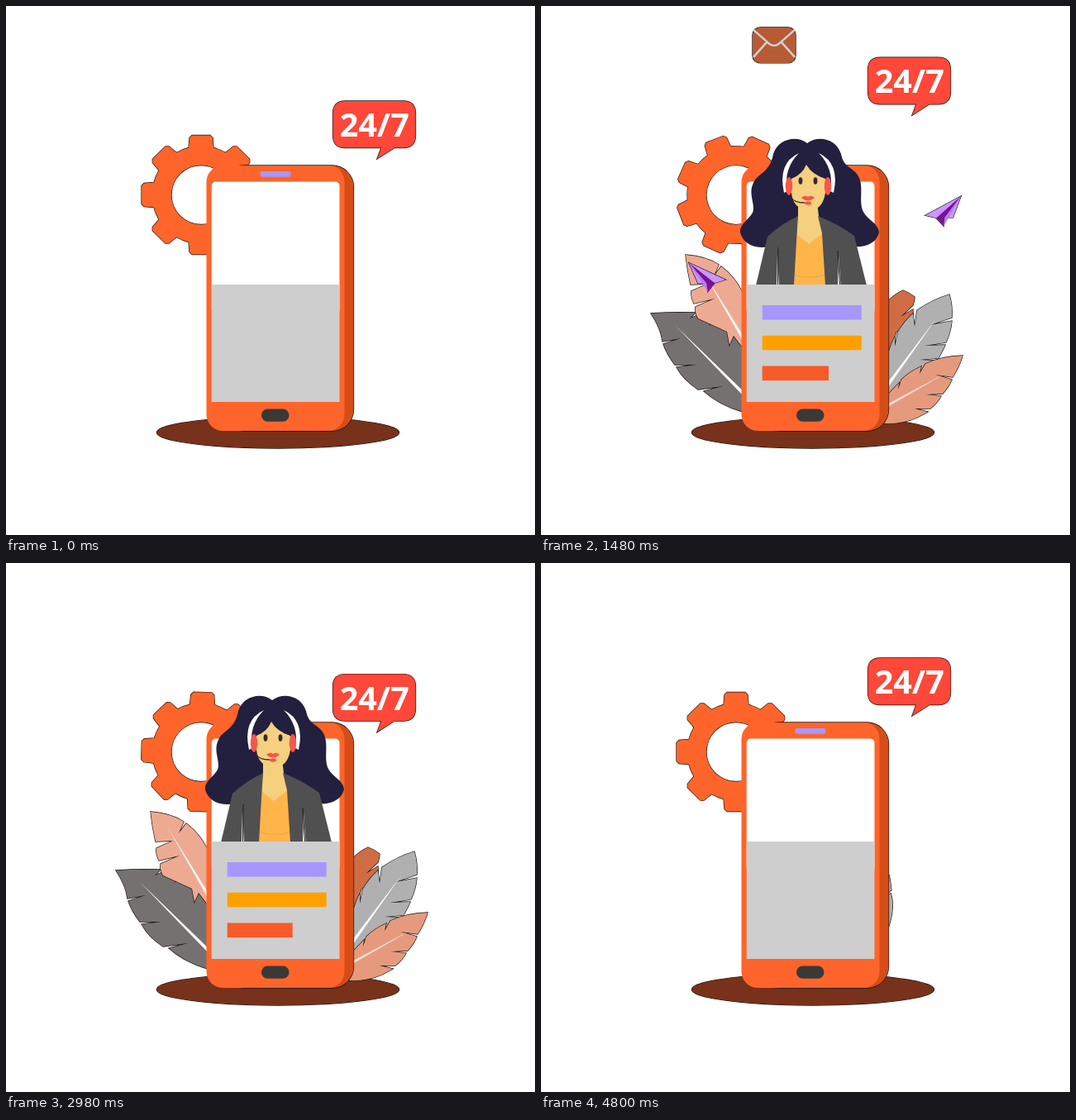
An HTML page that plays this animation: 640 by 640 pixels, repeating every 4.84 s.

```html
<!DOCTYPE html>
<html lang="en">
<head>
<meta charset="utf-8">
<title>Support around the clock</title>
<style>
html, body { margin: 0; width: 100%; height: 100%; overflow: hidden; background: #fff; }
svg { display: block; width: 100vw; height: 100vh; }
.edge { stroke: #141010; stroke-width: 1.3; paint-order: stroke; }
.line { fill: none; stroke: #fff; stroke-width: 2.4; }
.rib { fill: #fff; }
text { font: 700 39.6px "Open Sans", sans-serif; fill: #fff; text-anchor: middle; }
</style>
</head>
<body>
<svg viewBox="0 0 640 640">
  <defs>
    <g id="mail">
      <rect class="edge" x="256" width="52" height="43" rx="9" fill="#de6e40"/>
      <path class="line" d="M257 3L273 17Q282 27 291 17L307 3M257 36L273 18M307 36L291 18"/>
    </g>
    <g id="plane">
      <path class="edge" fill="#cb97ff" d="M29 0L-21 -13L-13 -1L-13 13L-5 6L3 13Z"/>
      <path fill="#7c1097" d="M29 0L-13 -1L-13 13L-5 6Z"/>
      <path fill="#b87bf2" d="M29 0L-13 13L-5 6Z"/>
    </g>
  </defs>

  <ellipse class="edge" cx="329" cy="516" rx="146.6" ry="19" fill="#78311a"/>
  <path id="gear" class="edge" fill="#ff652a" fill-rule="evenodd"/>

  <g id="greyLeft">
    <path class="edge" fill="#757170" d="M133 372Q160 370 187 371L180 378L192 373Q202 375 210 379L203 387L214 381Q228 387 243 404L260 480L244 491Q216 483 197 466L220 460L190 464Q172 452 164 437L188 434L162 434Q152 421 148 409L169 402L147 406Q145 390 133 372Z"/>
    <path class="rib" d="M163 387L251 472L248 475Z"/>
  </g>
  <g id="pinkLeft">
    <path class="edge" fill="#edaa92" d="M175 301Q200 303 215 313L209 327L218 315Q234 327 243 345L262 420L243 412L233 399L228 410L225 394L190 378Q186 372 187 364L210 354L185 360Q181 353 182 345L202 336L181 337Q177 320 175 301Z"/>
    <path class="rib" fill-opacity=".85" d="M195 319L251 409L248 412Z"/>
  </g>
  <g id="orange">
    <path class="edge" fill="#d06c44" d="M438 344Q446 347 452 352Q452 357 450 362L435 376L450 367Q451 374 449 381L430 394L418 430L400 430L400 380Q420 352 438 344Z"/>
  </g>
  <g id="greyRight">
    <path class="edge" fill="#b0b0b0" d="M494 349Q474 355 455 368L452 388L450 372Q440 381 432 394L428 412L428 400Q420 415 416 440L405 480L450 462Q472 447 478 429L458 428L481 426Q487 415 489 410L464 411L490 407Q496 394 497 381L471 386L497 377Q498 362 494 349Z"/>
    <path class="rib" d="M479 377L413 471L410 468Z"/>
  </g>
  <g id="pinkRight">
    <path class="edge" fill="#e59a7d" d="M510 423Q483 424 465 433L458 445L460 436Q445 443 436 452L432 464L433 456L412 478L405 504Q432 508 455 498L468 491L452 487L471 487Q480 480 484 472L466 470L486 469Q494 460 497 452L477 446L498 449Q506 437 510 423Z"/>
    <path class="rib" fill-opacity=".65" d="M492 443L409 491L407 488Z"/>
  </g>

  <g id="mails"></g>
  <use id="planeL" href="#plane"/>
  <use id="planeR" href="#plane"/>

  <rect class="edge" x="262" y="193" width="158.5" height="321" rx="26" fill="#d44d18"/>
  <rect x="242.5" y="193" width="167" height="321" rx="20" fill="#ff652a"/>
  <path fill="#ff652a" d="M380 193H392Q409 195 409 217H380Z"/>
  <rect x="307.5" y="200" width="37" height="6.8" rx="3" fill="#a796fd"/>
  <rect x="248.7" y="212.5" width="154.8" height="160" rx="5" fill="#fff"/>
  <rect x="309" y="487.5" width="33.5" height="15.2" rx="7.5" fill="#3b3838"/>

  <g id="agent">
    <path fill="#231f3e" d="M322 166C310 156 287 160 281 179C277 202 262 202 257 214C250 228 260 240 256 250C250 260 240 264 241 274C245 290 265 297 284 288L366 288C382 295 405 291 409 274C408 262 394 259 389 247C384 232 392 216 382 203C376 195 366 195 363 179C357 160 335 156 322 166Z"/>
    <path fill="#ffb54a" d="M311 254H336L345 285V338H305V285Z"/>
    <path fill="#f4d07f" d="M311 238H334L336 254L342 274L324 288L308 275L311 254Z"/>
    <path fill="#f4d07f" d="M303 209Q316 204 321 192Q328 204 344 209V226Q341 247 323 248Q305 245 303 226Z"/>
    <path fill="#505050" d="M311 254L309 285L306 338H260L274 279Q290 264 311 254ZM335 254Q360 264 379 278L394 338H344L340 275Z"/>
    <path fill="#fff" d="M286 300L288 338H285ZM360 302L362.5 338H359Z"/>
    <path fill="none" stroke="#1c1c1c" d="M287 292L286.5 338M359 296L361.5 338"/>
    <path fill="none" stroke="#f0a23a" d="M307 325L315 328H335L343 325"/>
    <path fill="#fff" d="M312 178Q286 190 294 226L298 224Q293 197 312 178ZM336 178Q362 190 354 226L350 224Q355 197 336 178Z"/>
    <g fill="#f4574a">
      <ellipse cx="300" cy="218" rx="4.2" ry="11"/>
      <ellipse cx="347" cy="218" rx="4.2" ry="11"/>
      <path d="M315 232Q319 228 323 231Q327 228 331 232Q323 239 315 232Z"/>
      <ellipse cx="323" cy="238.5" rx="4" ry="2.2"/>
    </g>
    <g fill="#38282c">
      <ellipse cx="314" cy="211.5" rx="2.4" ry="4.2"/>
      <ellipse cx="332" cy="211.5" rx="2.4" ry="4.2"/>
    </g>
    <path fill="none" stroke="#38282c" stroke-width="1.4" d="M302 231Q306 238 319 238"/>
  </g>

  <rect x="248.7" y="337" width="154.8" height="142" fill="#cecece"/>
  <g id="bars">
    <rect x="267.7" y="362" height="17.6" fill="#a796fd"/>
    <rect x="267.7" y="398.7" height="17.6" fill="#ffa000"/>
    <rect x="267.7" y="435.5" height="17.6" fill="#f75b28"/>
  </g>

  <g id="bubble">
    <path class="edge" fill="#ff4839" d="M410.5 0H480.5Q495.5 0 495.5 15V41.5Q495.5 56.5 480.5 56.5H470L449 70L454 56.5H410.5Q395.5 56.5 395.5 41.5V15Q395.5 0 410.5 0Z"/>
    <text x="445.7" y="43">24/7</text>
  </g>
</svg>
<script>
const LOOP = 4840, LAST = 4800, STEP = 20;
const $ = id => document.getElementById(id);
const clamp = x => Math.min(1, Math.max(0, x));
const smooth = x => (x = clamp(x), x * x * (3 - 2 * x));
const place = (el, transform) => el.setAttribute('transform', transform);

// rise past full size, then settle
const spring = ms => ms < 560 ? 1.1 * smooth(ms / 560) : 1.1 - 0.1 * smooth((ms - 560) / 440);
const life = (t, start, end, span) => spring(t - start) * (1 - smooth((t - end) / span));

// eased value through [time, value] stops
function track(t, stops) {
  let i = 1;
  while (i < stops.length - 1 && t > stops[i][0]) i++;
  const [t0, a] = stops[i - 1], [t1, b] = stops[i];
  return a + (b - a) * smooth((t - t0) / (t1 - t0));
}

const leaves = [
  { id: 'greyLeft', x: 302, y: 500, tuck: 44, start: 106, end: 3780, span: 620 },
  { id: 'pinkLeft', x: 265, y: 433, tuck: 42, start: 160, end: 3700, span: 600 },
  { id: 'greyRight', x: 405, y: 500, tuck: -37, start: 237, end: 4150, span: 740 },
  { id: 'orange', x: 390, y: 440, tuck: -40, start: 352, end: 3740, span: 600 },
  { id: 'pinkRight', x: 345, y: 500, tuck: -50, start: 106, end: 3780, span: 620 }
];

const bars = [
  { width: 120, start: 352, end: 3882 },
  { width: 120, start: 472, end: 3762 },
  { width: 79, start: 592, end: 3642 }
];

const planes = [
  { id: 'planeL', path: [[258, 392], [190, 290], [45, 255]], start: 1080, span: 1580, power: 1.5, gone: 2600, flip: -1 },
  { id: 'planeR', path: [[400, 395], [456, 230], [585, 195]], start: 640, span: 2430, power: 2, gone: 2680, flip: 1 }
];

const mailStarts = [0, 1200, 1620, 3160];
const mails = mailStarts.map(() => {
  const use = document.createElementNS('http://www.w3.org/2000/svg', 'use');
  use.setAttribute('href', '#mail');
  return $('mails').appendChild(use);
});

function gearPath() {
  const tooth = [[-15, -57], [-14, -69], [-11, -72], [11, -72], [14, -69], [15, -57]];
  let d = '';
  for (let k = 0; k < 8; k++) {
    const c = Math.cos(k * Math.PI / 4), s = Math.sin(k * Math.PI / 4);
    const p = tooth.map(([x, y]) => `${(x * c - y * s).toFixed(2)} ${(x * s + y * c).toFixed(2)}`);
    d += `${k ? 'A59 59 0 0 1 ' : 'M'}${p[0]}L${p.slice(1).join('L')}`;
  }
  return d + 'A59 59 0 0 1 -15 -57ZM36 0A36 36 0 1 0 -36 0A36 36 0 1 0 36 0Z';
}
$('gear').setAttribute('d', gearPath());

function show(el, visible, light) {
  el.style.display = visible ? '' : 'none';
  el.style.filter = light < 1 ? `brightness(${light})` : '';
}

function flyPlane(t, { id, path: [a, b, c], start, span, power, gone, flip }) {
  const el = $(id);
  show(el, t >= start && t < gone, clamp((gone - t) / 240));
  const u = 1 - (1 - clamp((t - start) / span)) ** power, v = 1 - u;
  const at = i => v * v * a[i] + 2 * u * v * b[i] + u * u * c[i];
  const slope = i => v * (b[i] - a[i]) + u * (c[i] - b[i]);
  const turn = Math.atan2(slope(1), slope(0)) * 180 / Math.PI;
  place(el, `translate(${at(0)} ${at(1)}) rotate(${turn}) scale(.95 ${0.95 * flip})`);
}

function draw(t) {
  place($('gear'), `translate(236 228.5) rotate(${-360 * t / LAST})`);
  place($('bubble'), `translate(0 ${track(t, [[0, 115], [1710, 59.5], [3220, 140], [LAST, 115]])})`);

  for (const leaf of leaves) {
    const p = life(t, leaf.start, leaf.end, leaf.span);
    show($(leaf.id), p > 0.001);
    place($(leaf.id), `rotate(${leaf.tuck * (1 - p)} ${leaf.x} ${leaf.y})`);
  }

  mails.forEach((el, i) => {
    const ms = t - mailStarts[i];
    show(el, ms >= STEP && ms < 1600, ms / 340);
    place(el, `translate(0 ${9 + 208 * smooth(ms / 1600)})`);
  });

  planes.forEach(p => flyPlane(t, p));

  const size = track(t, [[137, 0.55], [1259, 1], [3598, 1], [4390, 0.55]]);
  show($('agent'), size > 0.551);
  place($('agent'), `translate(325 555) scale(${size}) translate(-325 -555)`);

  bars.forEach(({ width, start, end }, i) =>
    $('bars').children[i].setAttribute('width', width * life(t, start, end, 500)));
}

const begin = performance.now();
function tick() {
  const t = (performance.now() - begin) % LOOP;
  draw(Math.min(LAST, Math.floor(t / STEP) * STEP));
  requestAnimationFrame(tick);
}
tick();
</script>
</body>
</html>
```
